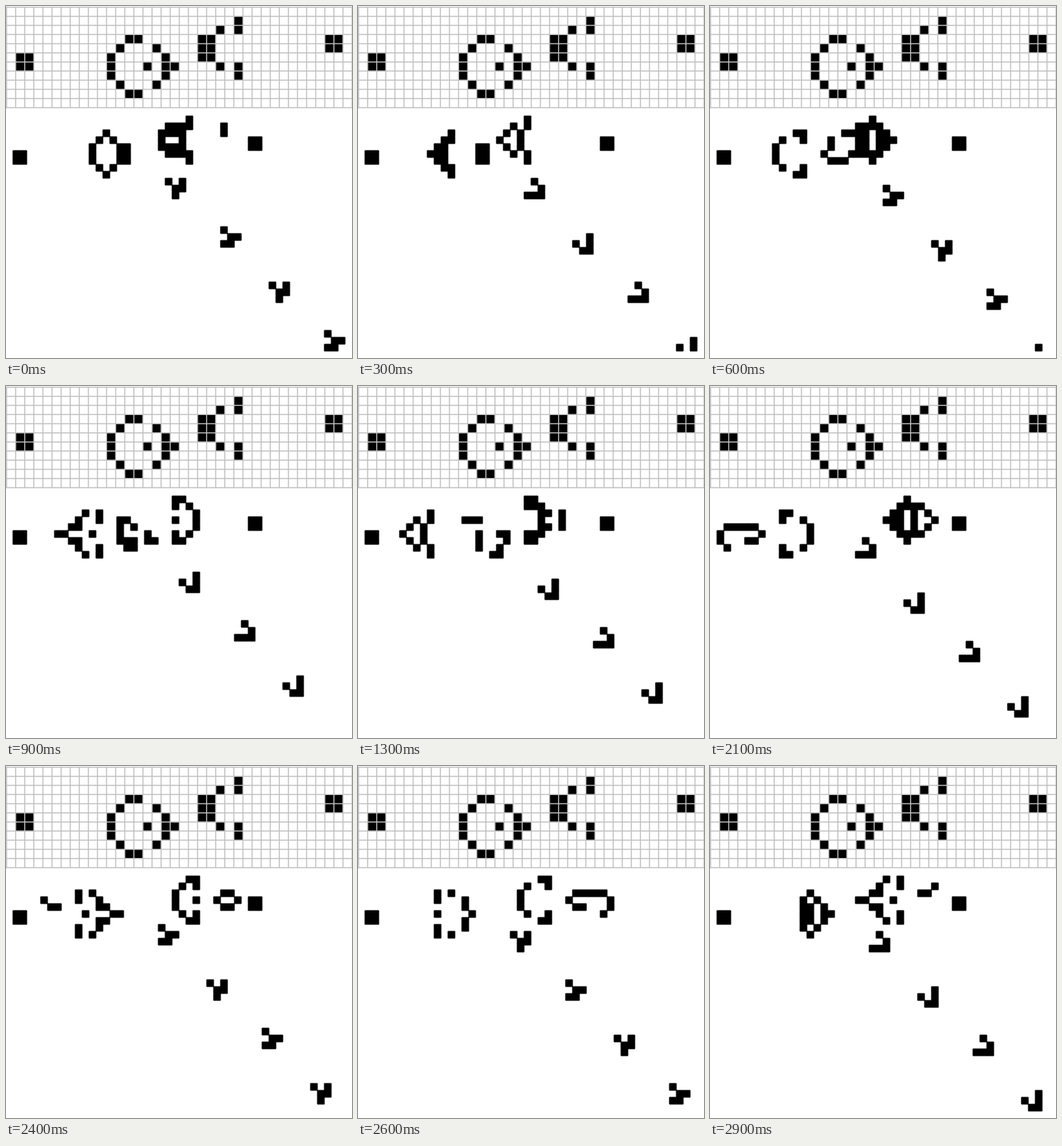
Write an HTML page with a canvas that moves like this. It is 500 px wide and 509 px high and loops after 3 s.

```html
<!DOCTYPE html>
<html lang="en">
<head>
<meta charset="utf-8">
<title>Glider gun</title>
<style>
  html, body { margin: 0; width: 100%; height: 100%; overflow: hidden; background: #fff; }
  canvas { display: block; }
</style>
</head>
<body>
<canvas id="stage" width="500" height="509"></canvas>
<script>
const ctx = document.getElementById('stage').getContext('2d');

const SIZE = 72, PAD = 4;
const PERIOD = 30, STEP = 100;
// Generations until the glider stream fills the view and the loop's first pose is reached.
const WARMUP = 4 * PERIOD - 2;

const at = (col, row) => (row + PAD) * SIZE + col + PAD;

const block = (col, row) => [[col, row], [col + 1, row], [col, row + 1], [col + 1, row + 1]];

// Columns listed by distance from a horizontal axis, reflected to both sides.
const mirror = (axis, columns) => columns.flatMap((cols, d) =>
  cols.flatMap(col => d ? [[col, axis - d], [col, axis + d]] : [[col, axis]]));

// Two queen bee shuttles, each held by a block at its outer end.
const gun = blockShift => [
  ...block(1, 5 + blockShift),
  ...mirror(6, [[11, 15, 17, 18], [11, 17], [12, 16], [13, 14]]),
  ...mirror(4, [[21, 22], [21, 22], [23, 25], [25]]),
  ...block(35, 3 + blockShift)
];

function step(grid) {
  const next = new Uint8Array(grid.length);
  for (let y = 1; y < SIZE - 1; y++) {
    for (let x = 1; x < SIZE - 1; x++) {
      const i = y * SIZE + x;
      let n = -grid[i];
      for (let dy = -SIZE; dy <= SIZE; dy += SIZE) {
        n += grid[i + dy - 1] + grid[i + dy] + grid[i + dy + 1];
      }
      next[i] = n === 3 || (n === 2 && grid[i]) ? 1 : 0;
    }
  }
  return next;
}

function buildCycle() {
  let grid = new Uint8Array(SIZE * SIZE);
  for (const [col, row] of gun(1)) grid[at(col, row)] = 1;
  for (let i = 0; i < WARMUP; i++) grid = step(grid);
  const cycle = [];
  for (let i = 0; i < PERIOD; i++) {
    cycle.push(grid);
    grid = step(grid);
  }
  return cycle;
}

function drawSeed() {
  const w = 13.14, h = 13.2, x0 = 0.8, y0 = 1.7;
  ctx.fillStyle = '#000';
  for (const [col, row] of gun(0)) ctx.fillRect(x0 + col * w, y0 + row * h, w, h);
  ctx.strokeStyle = '#c0c0c0';
  ctx.lineWidth = 1.5;
  ctx.beginPath();
  for (let i = 0; i <= 38; i++) {
    ctx.moveTo(x0 + i * w, y0 - 0.75);
    ctx.lineTo(x0 + i * w, y0 + 11 * h);
  }
  for (let i = 0; i <= 11; i++) {
    ctx.moveTo(0, y0 + i * h);
    ctx.lineTo(500, y0 + i * h);
  }
  ctx.stroke();
}

function drawLife(grid) {
  ctx.clearRect(0, 150, 500, 359);
  ctx.fillStyle = '#000';
  ctx.beginPath();
  for (let row = 1; row <= 34; row++) {
    for (let col = 0; col <= 48; col++) {
      if (grid[at(col, row)]) ctx.roundRect(col * 10 - 0.5, row * 10 + 148.5, 11, 11, 1);
    }
  }
  ctx.fill();
}

const cycle = buildCycle();
let shown = -1;

function tick() {
  const gen = Math.floor(performance.now() / STEP) % PERIOD;
  if (gen !== shown) drawLife(cycle[shown = gen]);
  requestAnimationFrame(tick);
}

drawSeed();
tick();
</script>
</body>
</html>
```
